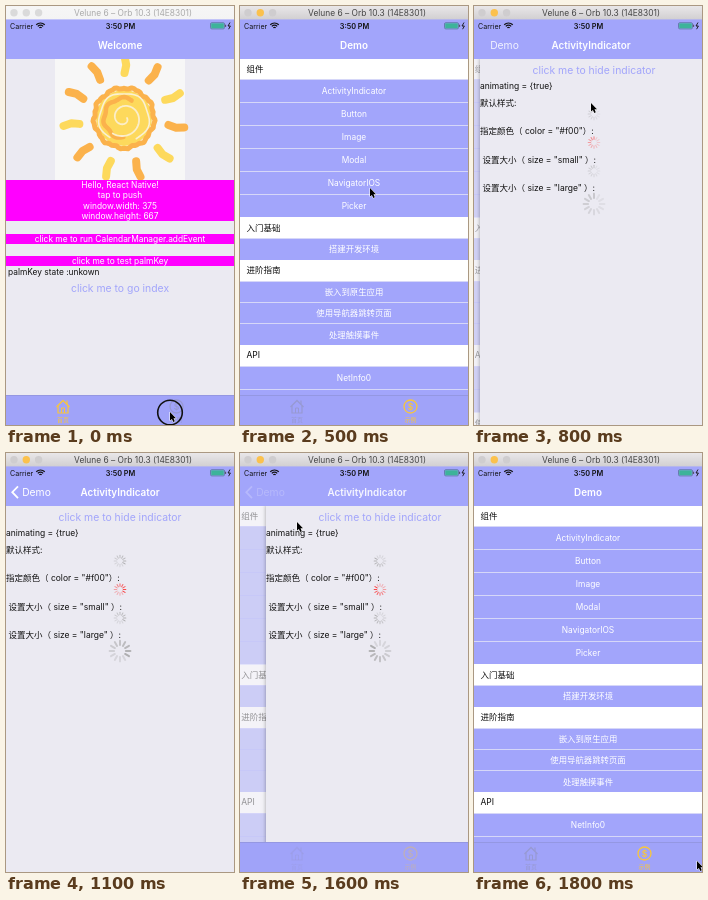
These frames come from a looping animation (228 px wide and 419 px high, 1.9 s). An HTML page with a canvas:

```html
<!DOCTYPE html>
<html lang="en">
<head>
<meta charset="utf-8">
<title>Tab and push navigation</title>
<style>
html, body { margin: 0; width: 100%; height: 100%; overflow: hidden; background: #ebeaf2; }
canvas { display: block; width: 228px; height: 419px; }
</style>
</head>
<body>
<canvas id="stage"></canvas>
<script>
const W = 228, H = 419, LOOP = 1900, STEP = 100;
const LAVENDER = '#a2a5fb', PAGE = '#ebeaf2', YELLOW = '#f8c63c', MUTED = '#9799d2';
const canvas = document.getElementById('stage');
const c = canvas.getContext('2d');
const scale = window.devicePixelRatio || 1;
canvas.width = W * scale;
canvas.height = H * scale;

// Piecewise linear keys: [time, ...values]
const pageKeys = [[700, W], [800, 6], [900, 0], [1500, 0], [1600, 26], [1700, 165], [1800, W]];
const cursorKeys = [[0, 164, 406], [200, 165, 404], [300, 160, 370], [600, 115, 88], [700, 115, 84],
  [800, 117, 97], [900, 100, 92], [1300, 22, 48], [1500, 20, 39], [1600, 57, 69], [1800, 223, 408]];

function at(keys, t) {
  if (t <= keys[0][0]) return keys[0].slice(1);
  const i = keys.findIndex(k => k[0] >= t);
  if (i < 0) return keys[keys.length - 1].slice(1);
  const a = keys[i - 1], b = keys[i], p = (t - a[0]) / (b[0] - a[0]);
  return a.slice(1).map((v, n) => v + (b[n + 1] - v) * p);
}

function rect(x, y, w, h, fill) {
  c.fillStyle = fill;
  c.fillRect(x, y, w, h);
}

function text(s, x, y, size, fill, align = 'center', weight = 400) {
  c.font = `${weight} ${size}px Inter, "Noto Sans CJK SC", "Noto Sans CJK", sans-serif`;
  c.textAlign = align;
  c.textBaseline = 'alphabetic';
  c.fillStyle = fill;
  c.fillText(s, x, y + size * 0.36);
}

function line(points, color, width = 1) {
  c.beginPath();
  points.forEach(p => c.lineTo(...p));
  c.strokeStyle = color;
  c.lineWidth = width;
  c.stroke();
}

function arc(x, y, r, color, width = 0, from = 0, to = Math.PI * 2) {
  c.beginPath();
  c.arc(x, y, r, from, to);
  c.fillStyle = c.strokeStyle = color;
  c.lineWidth = width;
  width ? c.stroke() : c.fill();
}

function faded(alpha, draw) {
  c.save();
  c.globalAlpha *= alpha;
  draw();
  c.restore();
}

function titleBar(active) {
  const g = c.createLinearGradient(0, 0, 0, 13);
  g.addColorStop(0, active ? '#e9e7e9' : '#f6f6f6');
  g.addColorStop(1, active ? '#d2d0d2' : '#f4f4f4');
  rect(0, 0, W, 13.4, g);
  const lights = active ? ['#cfcdcf', '#fbc14d', '#cfcdcf'] : ['#dadada', '#dadada', '#dadada'];
  lights.forEach((color, i) => arc(8 + i * 12.3, 6.7, 3.7, color));
  text('Velune 6 – Orb 10.3 (14E8301)', 127, 6.8, 8.4, active ? '#444' : '#aaa');
}

function statusBar() {
  rect(0, 13, W, 40, LAVENDER);
  text('Carrier', 4, 20, 7.1, '#111', 'left');
  for (const r of [2.2, 4.4, 6.6]) arc(34.5, 23, r - 0.6, '#111', 1.2, -2.36, -0.78);
  text('3:50 PM', 114.5, 20, 7.3, '#111', 'center', 600);
  c.beginPath();
  c.roundRect(204.5, 16.7, 14, 6.2, 1.3);
  c.strokeStyle = '#4d6a90';
  c.lineWidth = 0.7;
  c.stroke();
  rect(205.2, 17.3, 12.6, 5, '#3db39a');
  rect(219.2, 18.7, 0.9, 2.2, '#444');
  line([[224, 16.5], [222, 20], [224.4, 20], [222.6, 23.2]], '#111', 0.9);
}

function navTitle(s, x = 114) {
  text(s, x, 39.2, 9.9, '#fff', 'center', 600);
}

function house(color) {
  line([[50.5, 401], [57, 394.5], [63.5, 401]], color, 1.3);
  line([[52, 400], [52, 407], [62, 407], [62, 400]], color, 1.2);
  line([[61, 398], [61, 394.5]], color, 1.2);
  line([[55.5, 407], [55.5, 402], [58.5, 402], [58.5, 407]], color);
}

function tabBar(selected, alpha = 1) {
  rect(0, 389, W, 30, '#a0a3f9');
  rect(0, 389, W, 0.6, '#8d90d4');
  faded(alpha, () => {
    const [home, demo] = selected ? [MUTED, YELLOW] : [YELLOW, MUTED];
    house(home);
    text('首页', 57, 414, 6, home);
    arc(170.5, 400.5, 6.5, demo, 1.3);
    text('$', 170.5, 400.5, 8.5, demo, 'center', 600);
    text('示例', 170.5, 414, 6, demo);
  });
}

function sun(x, y) {
  const tones = ['#fbb24c', '#fdd95c'];
  const polar = (a, r) => [x + Math.cos(a) * r, y + Math.sin(a) * r];
  const brush = (radius, color, width, from, to) => {
    const points = [];
    for (let a = from; a < to; a += 0.08) points.push(polar(a, radius(a)));
    line(points, color, width);
  };
  c.save();
  c.lineCap = c.lineJoin = 'round';
  for (let i = 0; i < 11; i++) {
    const a = -2.13 + i * Math.PI * 2 / 11;
    line([polar(a, 45), polar(a + 0.03, 53), polar(a, 61)], tones[i % 2], 8);
  }
  arc(x, y, 28, tones[1]);
  // Rough outer ring and a loose swirl inside it
  brush(a => 30 + Math.sin(a * 9) * 0.9 + Math.sin(a * 23) * 0.6, tones[0], 5, 0, 6.4);
  brush(a => 25 + Math.sin(a * 5), '#faf0d4', 1.6, 2.2, 7.4);
  brush(a => 20 + Math.sin(a * 7), tones[0], 4.5, 1.6, 5.2);
  brush(a => 3 + a * 1.9, '#fbeeca', 1.8, 0, 8.5);
  c.restore();
}

function welcome() {
  rect(0, 52, W, H, PAGE);
  rect(49, 52, 130, 122, '#f7f7f7');
  sun(118, 112);
  for (const [y, h] of [[174, 41], [228, 10], [250, 10]]) rect(0, y, W, h, '#f0f');
  ['Hello, React Native!', 'tap to push', 'window.width: 375', 'window.height: 667']
    .forEach((s, i) => text(s, 114, 179.2 + i * 10.2, 8.4, '#fff'));
  text('click me to run CalendarManager.addEvent', 114, 232.7, 8.4, '#fff');
  text('click me to test palmKey', 114, 255, 8.4, '#fff');
  text('palmKey state :unkown', 2, 265.5, 8.4, '#111', 'left');
  text('click me to go index', 114, 282.3, 10.4, LAVENDER);
  statusBar();
  navTitle('Welcome');
  tabBar(0);
}

const sections = [
  ['组件', 'ActivityIndicator', 'Button', 'Image', 'Modal', 'NavigatorIOS', 'Picker'],
  ['入门基础', '搭建开发环境'],
  ['进阶指南', '嵌入到原生应用', '使用导航器跳转页面', '处理触摸事件'],
  ['API', 'NetInfo0', 'Alert'],
  ['使用指南Orb']
];

function list() {
  let y = 52.3;
  for (const [head, ...rows] of sections) {
    rect(0, Math.floor(y), W, 22, '#fff');
    text(head, 6.5, y + 10.2, 8.5, '#111', 'left');
    y += 21;
    for (const row of rows) {
      const h = /[a-z]/i.test(row) ? 23.05 : 21.4;
      const top = Math.floor(y);
      rect(0, top, W, Math.ceil(h), LAVENDER);
      rect(0, top, W, 1, '#d6d7f8');
      text(row, 114, y + h / 2, 8.4, '#fff');
      y += h;
    }
  }
}

function spinner(x, y, r, color, t) {
  c.save();
  c.lineCap = 'round';
  const lead = Math.floor(t * 12 / 1000);
  for (let i = 0; i < 12; i++) {
    const a = i * Math.PI / 6, age = (lead - i + 240) % 12;
    const point = d => [x + Math.cos(a) * d, y + Math.sin(a) * d];
    faded(Math.max(0.25, 0.75 - age * 0.06), () => line([point(r * 0.52), point(r * 0.92)], color, r * 0.17));
  }
  c.restore();
}

function detail(x, t) {
  c.save();
  c.shadowColor = 'rgba(0,0,0,.35)';
  c.shadowBlur = x ? 4 * scale : 0;
  rect(x, 52, W, H, PAGE);
  c.restore();
  c.save();
  c.translate(x, 0);
  text('click me to hide indicator', 114, 63.8, 10.4, LAVENDER);
  text('animating = {true}', 0, 80.3, 8.5, '#111', 'left');
  text('默认样式:', 0, 96.7, 8.5, '#111', 'left');
  text('指定颜色（ color = "#f00"）:', 0, 125.3, 8.5, '#111', 'left');
  text('设置大小（ size = "small" ）:', 2.5, 153.8, 8.5, '#111', 'left');
  text('设置大小（ size = "large" ）:', 2.5, 182.3, 8.5, '#111', 'left');
  faded(t <= 800 ? 0.6 : 1, () => {
    spinner(114, 108, 6.3, '#999', t);
    spinner(114, 136.5, 6.3, '#f00', t);
    spinner(114, 165, 6.3, '#999', t);
    spinner(114, 198, 11.3, '#999', t);
  });
  c.restore();
}

function demo(t) {
  const [x] = at(pageKeys, t);
  const pushed = t > 700 && t < 1800;
  const cover = pushed ? 1 - x / W : 0;
  rect(0, 52, W, H, PAGE);
  c.save();
  c.translate(pushed ? -6 * cover : 0, 0);
  faded(1 - cover * 0.65, list);
  c.restore();
  if (pushed) detail(x, t);
  statusBar();
  if (!pushed) navTitle('Demo');
  else {
    faded(cover, () => navTitle('ActivityIndicator', 114 + x / 2));
    const leaving = t >= 1600;
    faded(leaving ? cover * 0.25 : 0.85 + 0.15 * (x === 0), () => {
      text('Demo', 30.5, 39.3, 10.3, '#fff');
      if (!x || leaving) line([[12, 33.3], [6.3, 39.2], [12, 45.1]], '#fff', 1.8);
    });
    if (leaving) faded(1 - cover, () => navTitle('Demo'));
  }
  if (t < 700 || t >= 1600) tabBar(1, pushed ? 0.35 : 1);
}

function cursor(t) {
  if (t >= 1000 && t < 1300) return;
  const [x, y] = at(cursorKeys, t);
  if (t === 0) arc(164, 406.5, 12.3, '#111', 1.6);
  c.save();
  c.translate(x, y);
  c.beginPath();
  [[0, 0], [0, 8.6], [1.9, 6.9], [3.3, 10], [4.8, 9.3], [3.5, 6.3], [6, 6.2]].forEach(p => c.lineTo(...p));
  c.closePath();
  c.strokeStyle = '#fff';
  c.lineWidth = 1;
  c.stroke();
  c.fillStyle = '#000';
  c.fill();
  c.restore();
}

function draw(t) {
  c.setTransform(scale, 0, 0, scale, 0, 0);
  t < STEP ? welcome() : demo(t);
  titleBar(t >= STEP);
  cursor(t);
}

const start = performance.now();
function tick() {
  const t = (performance.now() - start) % LOOP;
  draw(Math.floor(t / STEP) * STEP);
  requestAnimationFrame(tick);
}
tick();
</script>
</body>
</html>
```
